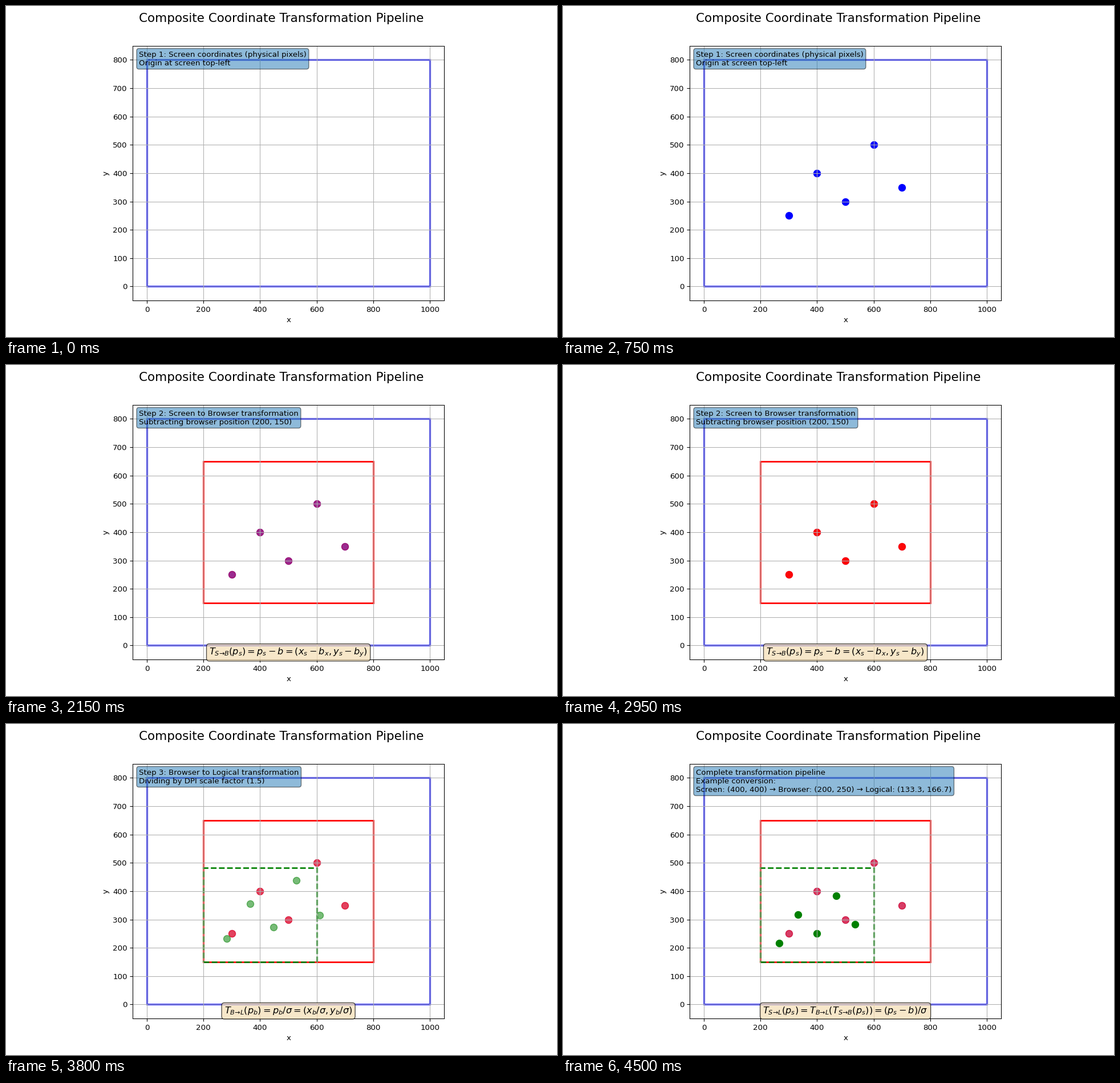
Recreate the animation shown at these times as a matplotlib script. Size 966 px wide and 580 px high, loop 6 s.

```python
import numpy as np
import matplotlib.pyplot as plt
from matplotlib.animation import FuncAnimation
from matplotlib.patches import Rectangle

WIDTH, HEIGHT, DPI = 966, 580, 96.6
FRAMES, INTERVAL, STEP = 120, 50, 30

ORIGIN = np.array([200, 150])
SCALE = 1.5
SCREEN = np.array([(300, 250), (400, 400), (500, 300), (600, 500), (700, 350)])
LOGICAL = ORIGIN + (SCREEN - ORIGIN) / SCALE

INFO = [
    "Step 1: Screen coordinates (physical pixels)\nOrigin at screen top-left",
    "Step 2: Screen to Browser transformation\nSubtracting browser position (200, 150)",
    "Step 3: Browser to Logical transformation\nDividing by DPI scale factor (1.5)",
    "Complete transformation pipeline\nExample conversion:\n"
    "Screen: (400, 400) → Browser: (200, 250) → Logical: (133.3, 166.7)",
]
# A literal arrow is set tight, without the spacing of \rightarrow.
FORMULA = [
    "",
    r"$T_{S→B}(p_s) = p_s - b = (x_s - b_x, y_s - b_y)$",
    r"$T_{B→L}(p_b) = p_b / \sigma = (x_b / \sigma, y_b / \sigma)$",
    r"$T_{S→L}(p_s) = T_{B→L}(T_{S→B}(p_s)) = (p_s - b) / \sigma$",
]

# The extra hundredth keeps the pixel size from being rounded down.
fig, ax = plt.subplots(figsize=((WIDTH + 0.01) / DPI, (HEIGHT + 0.01) / DPI), dpi=DPI)
fig.suptitle("Composite Coordinate Transformation Pipeline", fontsize=16)
ax.set_xlim(-50, 1050)
ax.set_ylim(-50, 850)
ax.set_aspect("equal")
ax.set_xlabel("x")
ax.set_ylabel("y")
ax.grid(True)


def add_frame(corner, width, height, color, style="-"):
    return ax.add_patch(Rectangle(corner, width, height, fill=False, lw=2,
                                  edgecolor=color, linestyle=style))


def add_dots(color):
    return ax.scatter(SCREEN[:, 0], SCREEN[:, 1], s=80, c=color, alpha=0)


add_frame((0, 0), 1000, 800, "blue")
browser = add_frame(ORIGIN, 600, 500, "red")
logical = add_frame(ORIGIN, 600 / SCALE, 500 / SCALE, "green", "--")
blue, red, green = (add_dots(c) for c in ("blue", "red", "green"))

info = ax.text(0.02, 0.98, "", transform=ax.transAxes, va="top",
               bbox=dict(boxstyle="round", alpha=0.5))
formula = ax.text(0.5, 0.02, "", transform=ax.transAxes, ha="center", fontsize=12,
                  bbox=dict(boxstyle="round", facecolor="wheat", alpha=0.7))


def dot_alphas(step, p):
    """Opacity of the screen, browser and logical dots."""
    if step == 0:
        return min(1, 2 * p), 0, 0
    if step == 1:
        return 1 - 0.7 * p, p, 0
    if step == 2:
        return 0.3, 1 - 0.7 * p, p
    return 0.4, 0.6, 1


def update(frame):
    step = min(frame // STEP, 3)
    p = min((frame - step * STEP) / STEP, 1)

    info.set_text(INFO[step])
    formula.set_text(FORMULA[step])
    formula.set_visible(step > 0)
    browser.set_visible(step > 0)
    logical.set_visible(step > 1)

    for dots, alpha in zip((blue, red, green), dot_alphas(step, p)):
        dots.set_alpha(alpha)
    travel = (0, 0, p, 1)[step]
    green.set_offsets(SCREEN + travel * (LOGICAL - SCREEN))
    return blue, red, green, browser, logical, info, formula


anim = FuncAnimation(fig, update, frames=FRAMES, interval=INTERVAL,
                     init_func=lambda: update(0), repeat=True, repeat_delay=0)
plt.show()
```
